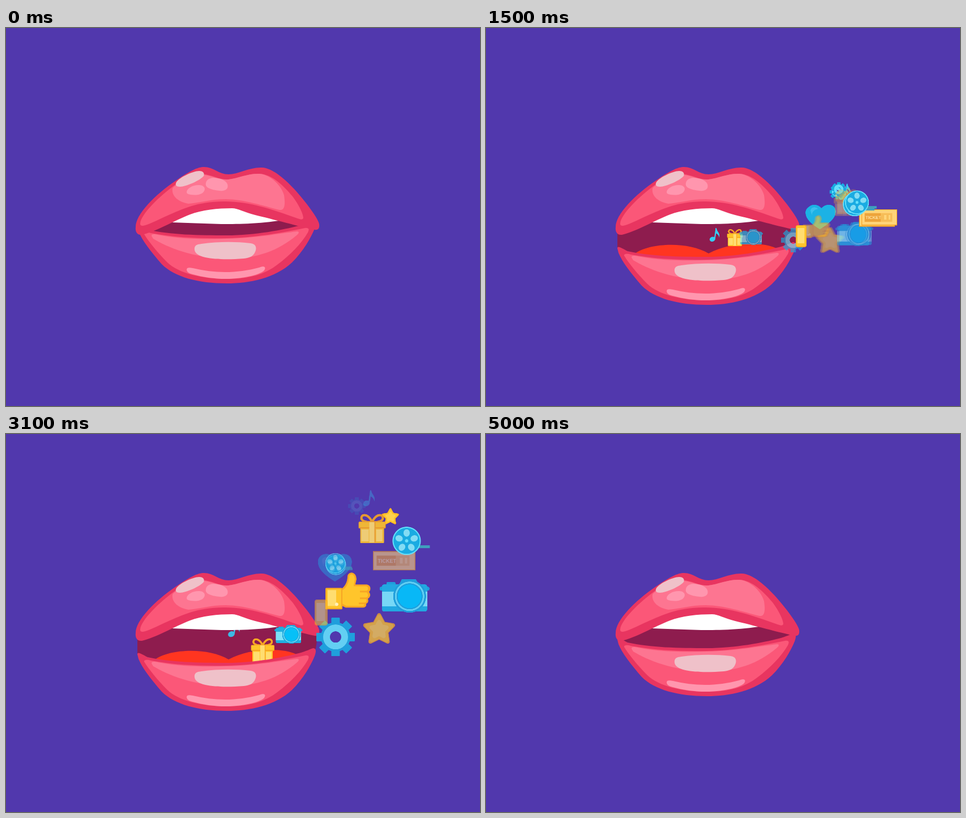
An HTML page with a canvas for the animation above (5100 ms loop, 837x669 px).

```html
<!DOCTYPE html>
<html lang="en">
<head>
<meta charset="utf-8">
<title>Talking lips</title>
<style>
  html, body { margin: 0; width: 100%; height: 100%; overflow: hidden; background: #5138ad; }
  canvas { display: block; }
</style>
</head>
<body>
<canvas id="stage" width="837" height="669"></canvas>
<script>
const LOOP = 5100, STEP = 100, TAU = Math.PI * 2;
const ctx = document.getElementById('stage').getContext('2d');
const clamp = (v, lo = 0, hi = 1) => Math.min(hi, Math.max(lo, v));
const ease = s => s * s * (3 - 2 * s);

// ---------- lips ----------
const shape = (color, d) => ({ color, path: new Path2D(d) });
const RED = '#e83560', PINK = '#fb5778', SOFT = '#fd7591', SHINE = '#ff96ae', GLOSS = '#efc1c9';

const lowerLip = [
  shape(RED, 'M232 352C232 346 240 352 250 357C290 366 340 367 390 367C440 367 490 357 517 350C530 347 540 341 543 341C549 342 547 349 545 355C538 372 525 395 505 415C475 443 430 452 390 452C340 452 298 441 275 418C255 395 240 375 234 360Z'),
  shape(PINK, 'M244 365C243 361 250 361 256 363C300 371 345 373 390 372C440 371 490 362 528 354C535 353 536 356 533 362C522 381 502 402 479 419C457 436 430 444 390 444C345 444 305 434 285 415C268 398 252 378 244 365Z'),
  shape(SOFT, 'M257 368C257 364 262 365 268 366C310 374 350 374 390 373C440 372 480 364 514 360C519 360 517 364 513 367C480 395 440 409 390 408C330 407 285 388 260 373Z'),
  shape(GLOSS, 'M345 382C375 378 405 378 432 381C442 382 443 390 440 396C437 404 430 407 420 408C395 410 370 410 352 406C336 402 332 396 333 389C334 384 338 383 345 382Z'),
  shape(SHINE, 'M319 428C319 423 324 424 330 425C370 435 410 434 447 424C454 421 459 422 457 427C455 432 448 434 440 437C405 447 365 446 330 436C322 434 320 432 319 428Z')
];
const upperLip = [
  shape('#fff', 'M293 344C315 330 350 318 400 318C425 322 440 333 487 340C450 347 400 347 380 347C350 346 320 345 293 344Z'),
  shape(RED, 'M229 352C229 330 262 296 300 270C325 253 338 246 350 246C366 246 376 259 393 259C410 259 430 246 452 247C470 248 490 265 508 284C530 308 552 338 553 347C554 355 551 358 545 357C520 352 470 338 440 331C420 326 410 319 399 319C375 319 345 322 325 330C295 342 265 360 240 366C231 367 228 360 229 352Z'),
  shape(PINK, 'M237 346C238 330 270 298 302 275C325 260 340 257 352 259C368 262 378 269 393 268C410 266 428 257 448 258C470 259 490 279 506 298C518 314 525 330 525 336C524 341 518 338 512 336C470 321 430 307 388 307C340 306 310 321 285 332C265 341 250 349 242 350C238 350 237 349 237 346Z'),
  shape(SOFT, 'M294 284C298 278 315 267 335 260C360 257 372 270 393 268C410 266 428 257 448 258C468 260 487 280 491 296C494 316 491 323 483 322C455 315 420 303 388 303C360 303 340 310 322 311C305 308 292 298 294 284Z'),
  shape(GLOSS, 'M300 275C302 266 330 253 341 253C349 253 351 258 349 262C344 269 318 281 307 281C301 281 299 278 300 275Z'),
  shape(SHINE, 'M353 274C355 266 364 264 374 266C387 268 394 276 391 283C388 289 379 289 370 287C358 285 351 281 353 274ZM319 290C320 283 331 277 342 278C351 279 353 285 349 290C344 296 334 296 326 295C321 294 319 293 319 290Z')
];
const tongue = shape('#ff3520', 'M262 400C285 381 355 376 393 399C430 378 490 378 513 390L500 408L280 408Z');

function paint(list, dy = 0) {
  ctx.save();
  ctx.translate(0, dy);
  for (const s of list) {
    ctx.fillStyle = s.color;
    ctx.fill(s.path);
  }
  ctx.restore();
}

// ---------- icons, drawn once around their own centre ----------
const BLUE = '#1aabe2', SKY = '#65e0fb', CYAN = '#00c8ff', GOLD = '#ffc52b', LEMON = '#ffdd70', AMBER = '#f7a624';
let g;
function fill(color, d) { g.fillStyle = color; g.fill(new Path2D(d)); }
function disc(color, x, y, r) { g.fillStyle = color; g.beginPath(); g.arc(x, y, r, 0, TAU); g.fill(); }
function ring(color, r, w) { g.strokeStyle = color; g.lineWidth = w; g.beginPath(); g.arc(0, 0, r, 0, TAU); g.stroke(); }
function box(color, x, y, w, h, r = 0) { g.fillStyle = color; g.beginPath(); g.roundRect(x, y, w, h, r); g.fill(); }
function star(color, r) {
  g.beginPath();
  for (let i = 0; i < 10; i++) {
    const a = i * TAU / 10 - TAU / 4, q = i % 2 ? r * 0.52 : r;
    g.lineTo(Math.cos(a) * q, Math.sin(a) * q + 2);
  }
  g.closePath();
  g.fillStyle = g.strokeStyle = color;
  g.lineWidth = 7;
  g.fill();
  g.stroke();
}

const icons = {
  gear() {
    for (let i = 0; i < 8; i++) {
      g.save();
      g.rotate(i * TAU / 8);
      box(BLUE, -7.5, -34, 15, 12, 1);
      g.restore();
    }
    ring(BLUE, 18, 16);
    ring(SKY, 16, 12);
  },
  reel() {
    box('#3f9fbd', 10, 8, 31, 5);
    disc(SKY, 0, 0, 25);
    disc(BLUE, 0, 0, 23);
    for (let i = 0; i < 5; i++) {
      g.save();
      g.rotate(i * TAU / 5);
      g.fillStyle = '#83dcf4';
      g.beginPath();
      g.ellipse(0, -14, 5.5, 6.5, 0, 0, TAU);
      g.fill();
      g.restore();
    }
    disc(SKY, 0, 0, 3);
  },
  ticket() {
    box(AMBER, -37.5, -17, 75, 34);
    box('#ffd478', -36, -15.5, 72, 31);
    box('#eda43a', -31, -9, 58, 18);
    box('#f6bd57', 3, -9, 24, 18);
    g.fillStyle = '#ffe2a0';
    g.font = 'bold 9px "Liberation Sans", sans-serif';
    g.fillText('TICKET', -29, 3.5);
    box('#ffd478', 10, -5, 5, 10);
    box('#ffd478', 19, -5, 4, 10);
  },
  gift() {
    g.strokeStyle = AMBER;
    g.lineWidth = 4;
    g.stroke(new Path2D('M0 -11C-6 -26 -19 -27 -19 -18C-18 -12 -8 -11 0 -11C6 -26 19 -27 19 -18C18 -12 8 -11 0 -11'));
    box(GOLD, -21, -2, 42, 28, 2);
    box(LEMON, -19, 2, 13, 21);
    box(LEMON, 7, 2, 11, 21);
    box(AMBER, -24, -12, 48, 12, 2);
    box(GOLD, -23, -11, 46, 9, 2);
    box(LEMON, -5, -11, 10, 36);
    box(AMBER, 4, -11, 2, 36);
  },
  camera() {
    box(BLUE, -44, -17, 88, 7, 3);
    box(BLUE, -32, -25, 16, 8, 2);
    fill(BLUE, 'M-10 -20L-5 -30H20L26 -20Z');
    box('#1eb6e8', -40, -21, 80, 48, 4);
    box('#7debff', -40, -8, 80, 26);
    box(SKY, -2, -27, 20, 6, 2);
    disc(BLUE, 9, 0, 29);
    disc(SKY, 9, 0, 26);
    disc(BLUE, 9, 0, 23);
    disc(CYAN, 9, 0, 21);
  },
  star() { star(AMBER, 26); star(GOLD, 23); star('#ffd24d', 14); },
  thumb() {
    box(AMBER, -39, -4, 30, 38, 2);
    box(GOLD, -37, -2, 26, 34, 1);
    box(LEMON, -35, 0, 15, 28);
    disc('#fff0ba', -19, 25, 3);
    fill(AMBER, 'M-11 -2C-4 -7 0 -15 0 -24C1 -34 16 -34 16 -19L14 -10H34C42 -9 42 0 38 3C42 8 40 13 36 15C38 20 36 23 33 24C34 29 31 31 26 31H-3L-11 27Z');
    fill(GOLD, 'M-9 0C-1 -5 3 -15 3 -24C4 -30 13 -30 13 -19L11 -7H33C38 -6 37 0 34 1H22V4H34C38 8 37 12 33 13H22V16H33C35 19 33 22 30 22H20V25H30C30 28 27 28 24 28H-2L-9 24Z');
  },
  heart() {
    fill('#1cb2e5', 'M0 26C-20 14 -30 3 -30 -9C-30 -24 -9 -28 0 -15C9 -28 30 -24 30 -9C30 3 20 14 0 26Z');
    fill('#3cc0ee', 'M-23 -10C-23 -18 -13 -20 -7 -14C-15 -13 -20 -8 -20 -1Z');
  },
  phone() {
    box(AMBER, -11.5, -23, 23, 46, 4);
    box(GOLD, -10, -21.5, 20, 43, 3);
    box(LEMON, -8, -17, 15, 32, 1);
  },
  note() {
    g.fillStyle = '#35cdf5';
    g.beginPath();
    g.ellipse(-4, 8, 5.5, 4.5, -0.4, 0, TAU);
    g.fill();
    fill('#35cdf5', 'M-1 8L2 -13H4C4 -6 11 -5 9 5C8 0 5 -2 3 -3L1 9Z');
  }
};

const SIZE = 100, RES = 2, sprites = {};
for (const kind in icons) {
  const c = document.createElement('canvas');
  c.width = c.height = SIZE * RES;
  g = c.getContext('2d');
  g.scale(RES, RES);
  g.translate(SIZE / 2, SIZE / 2);
  g.lineJoin = 'round';
  icons[kind]();
  sprites[kind] = c;
}

// kind, scale, spread position, settled position, fade end, fade length, opacity and size when spread
const item = ([kind, scale, x0, y0, x1, y1, end, span, dim = 1, grow = 1]) =>
  ({ kind, scale, x0, y0, x1, y1, end, span, dim, grow });

const inside = [
  ['note', 1.1, 403, 358, 402, 340, 4000, 1000],
  ['gift', 0.86, 442, 367, 458, 391, 4250, 900, 1, 0.8]
].map(item);

const outside = [
  ['camera', 0.56, 473, 366, 510, 350, 4250, 1200, 0.7],
  ['gear', 1, 554, 376, 594, 352, 4000, 1000, 0.65, 0.75],
  ['star', 1, 626, 376, 673, 331, 3850, 1000, 0.6],
  ['camera', 1, 673, 355, 717, 258, 3950, 950, 0.7, 0.85],
  ['heart', 1, 608, 291, 569, 211, 3900, 2000],
  ['reel', 0.72, 620, 351, 565, 176, 3950, 1000, 0],
  ['thumb', 1, 598, 326, 605, 255, 4080, 950, 0.6, 0.72],
  ['phone', 1, 569, 362, 551, 296, 4600, 2700],
  ['note', 1.1, 654, 204, 635, 75, 3700, 1900],
  ['gear', 0.45, 641, 200, 610, 96, 3300, 1200],
  ['star', 0.53, 660, 217, 687, 115, 4750, 1500, 0.5],
  ['gift', 1, 657, 242, 642, 135, 4450, 1500, 0.5],
  ['ticket', 1, 719, 297, 671, 193, 4900, 3000],
  ['reel', 1, 676, 245, 721, 165, 4700, 1500]
].map(item);

const BURST = 700, SPREAD = 2100, SETTLE = 4000;
const decay = t => 1 - Math.exp(-(t - SPREAD) / 1300);
const drift = t => decay(t) / decay(SETTLE);

function place(o, t) {
  if (t < SPREAD) {
    const s = clamp((t - BURST) / (SPREAD - BURST));
    return {
      x: 410 + (o.x0 - 410) * (1 - (1 - s) ** 3),
      y: 375 + (o.y0 - 375) * s ** 1.2
    };
  }
  const k = drift(t);
  return { x: o.x0 + (o.x1 - o.x0) * k, y: o.y0 + (o.y1 - o.y0) * k };
}

function drawItem(o, t) {
  if (t <= BURST || t >= o.end) return;
  const s = clamp((t - BURST) / (SPREAD - BURST));
  const late = clamp((t - SPREAD) / 500);
  const mix = from => from + (1 - from) * late;
  const alpha = clamp((t - BURST) / 500) * mix(o.dim) * clamp((o.end - t) / o.span);
  const size = SIZE * o.scale * (0.5 + 0.5 * clamp(s * 1.2)) * mix(o.grow);

  // smear fast movers over a short shutter time
  const now = place(o, t), before = place(o, t - 70);
  const n = clamp(Math.ceil(Math.hypot(now.x - before.x, now.y - before.y) / 6), 1, 10);
  ctx.globalAlpha = 1 - (1 - alpha) ** (1 / n);
  for (let i = n - 1; i >= 0; i--) {
    const p = place(o, t - 70 * i / n);
    ctx.drawImage(sprites[o.kind], p.x - size / 2, p.y - size / 2, size, size);
  }
  ctx.globalAlpha = 1;
}

// ---------- scene ----------
function jaw(t) {
  if (t < 3600) return 38 * ease(clamp((t - 50) / 650));
  return 38 - 26 * ease(clamp((t - 3600) / 400));
}

function draw(t) {
  const dy = jaw(t);
  ctx.fillStyle = '#5138ad';
  ctx.fillRect(0, 0, 837, 669);

  ctx.fillStyle = '#8e1c4e';
  ctx.fill(new Path2D(`M232 355L380 317L551 352L547 ${342 + dy}L390 ${395 + dy}L232 ${352 + dy}Z`));
  paint([tongue]);
  inside.forEach(o => drawItem(o, t));
  paint(lowerLip, dy);
  paint(upperLip);
  outside.forEach(o => drawItem(o, t));
}

const start = performance.now();
function tick() {
  const t = (performance.now() - start) % LOOP;
  draw(Math.floor(t / STEP) * STEP);
  requestAnimationFrame(tick);
}
tick();
</script>
</body>
</html>
```
